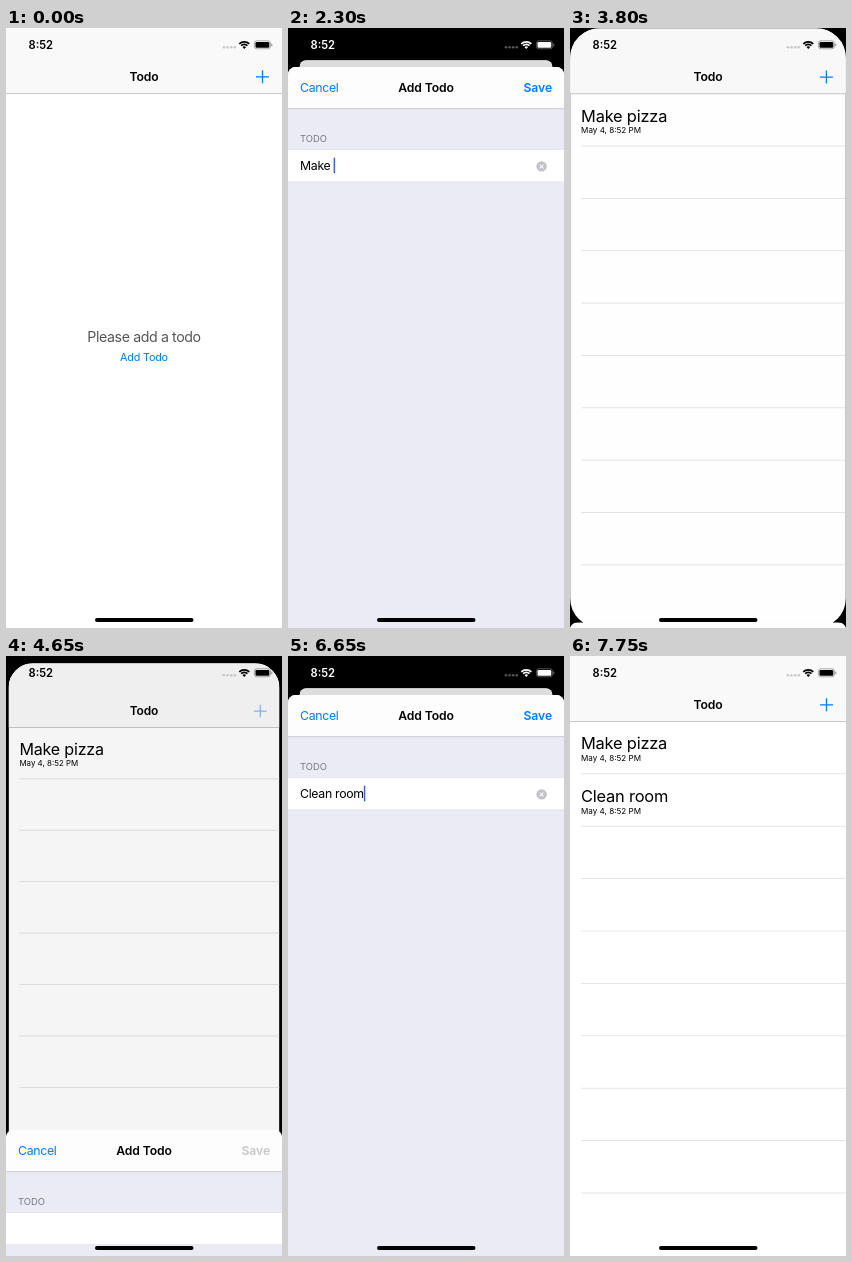
Write an HTML page with a canvas that moves like this. It is 276x600 px and loops after 7.85 s.

```html
<!DOCTYPE html>
<html lang="en">
<head>
<meta charset="utf-8">
<title>Todo</title>
<style>
html, body { margin: 0; width: 100%; height: 100%; overflow: hidden; background: #fff; }
canvas { display: block; width: 276px; height: 600px; }
</style>
</head>
<body>
<canvas id="stage"></canvas>
<script>
const W = 276, H = 600, LOOP = 7850, STEP = 50;
const SHEET_TOP = 39, SHEET_H = H - SHEET_TOP, DEVICE_RADIUS = 30;
const CARD_INSET = 11.5, CARD_TOP = 32.2;
const BLUE = [0, 122, 255], DIMMED_TINT = [160, 164, 170];
const BODY = { size: 12.3, track: -0.3 };
const BOLD = { size: 12.2, track: -0.1, weight: 600 };

const canvas = document.getElementById('stage');
const ctx = canvas.getContext('2d');
const dpr = window.devicePixelRatio || 1;
canvas.width = W * dpr;
canvas.height = H * dpr;

// One session per added todo: button press, sheet in, typing, sheet out.
const sessions = [
  { title: 'Make pizza', press: 500, release: 750, show: 924, settled: 1550, focus: 1600, blur: 3250, hide: 3457,
    keys: [1750, 1950, 2050, 2150, 2250, 2400, 2550, 2750, 2900, 3100] },
  { title: 'Clean room', press: 4250, release: 4550, show: 4604, settled: 5250, focus: 5200, blur: 7150, hide: 7207,
    keys: [5250, 5450, 5600, 5700, 5850, 6050, 6150, 6300, 6400, 6550] }
];

const clamp = v => Math.max(0, Math.min(1, v));
const ease = k => k * k * (3 - 2 * k);
const mix = (a, b, k) => a + (b - a) * k;
const rgb = c => `rgb(${c.map(Math.round).join(',')})`;
const mixColor = (a, b, k) => rgb(a.map((v, i) => mix(v, b[i], k)));

// Critically damped spring: 0 at rest, 1 when arrived.
function spring(ms) {
  if (ms <= 0) return 0;
  const x = 19.4 * ms / 1000;
  const left = (1 + x) * Math.exp(-x);
  return left < 0.0006 ? 1 : 1 - left;
}

function setFont({ size, track = 0, weight = 400 }) {
  ctx.font = `${weight} ${size}px Inter, "Liberation Sans", sans-serif`;
  ctx.letterSpacing = `${track}px`;
}

function text(str, x, y, style, color, align = 'left') {
  setFont(style);
  ctx.fillStyle = color;
  ctx.textAlign = align;
  ctx.fillText(str, x, y);
}

function rect(x, y, w, h, color) {
  ctx.fillStyle = color;
  ctx.fillRect(x, y, w, h);
}

function pill(x, y, w, h, r, color) {
  ctx.beginPath();
  ctx.roundRect(x, y, w, h, r);
  ctx.fillStyle = color;
  ctx.fill();
}

function cross(x, y, r, width, color) {
  ctx.beginPath();
  ctx.moveTo(x - r, y);
  ctx.lineTo(x + r, y);
  ctx.moveTo(x, y - r);
  ctx.lineTo(x, y + r);
  ctx.strokeStyle = color;
  ctx.lineWidth = width;
  ctx.stroke();
}

function drawEmpty() {
  text('Please add a todo', W / 2, 314, { size: 14.2, track: -0.4 }, '#555', 'center');
  text('Add Todo', W / 2, 333, { size: 10.8, track: -0.2 }, rgb(BLUE), 'center');
}

function drawRow(title, i) {
  const y = 52.4 * i;
  text(title, 11, 93.4 + y, { size: 16.4, track: -0.2 }, '#000');
  text('May 4, 8:52 PM', 11, 105.2 + y, { size: 8.1 }, '#000');
}

// How far the todo of a session has faded into the list.
const addedAmount = (t, s) => ease(clamp((t - s.hide) / 300));

function drawList(t, opacity) {
  ctx.globalAlpha = opacity;
  for (let i = 1; i < 10; i++) rect(11, 65 + 52.4 * i, W - 11, 0.8, '#dededf');
  sessions.forEach((s, i) => {
    ctx.globalAlpha = addedAmount(t, s);
    drawRow(s.title, i);
  });
  ctx.globalAlpha = 1;
}

function plusOpacity(t, s) {
  if (t < s.press) return 1;
  return t < s.release ? 0.2 : mix(0.2, 1, clamp((t - s.release) / 250));
}

function drawMain(t, s, p) {
  ctx.save();
  if (p > 0) {
    const scale = 1 - 2 * CARD_INSET * p / W;
    ctx.translate(CARD_INSET * p, CARD_TOP * p);
    ctx.scale(scale, scale);
    ctx.beginPath();
    ctx.roundRect(0, 0, W, H, mix(DEVICE_RADIUS, 7.4, p));
    ctx.clip();
  }
  rect(0, 0, W, H, '#fff');
  const listOpacity = addedAmount(t, sessions[0]);
  if (listOpacity < 1) {
    ctx.globalAlpha = 1 - listOpacity;
    drawEmpty();
  }
  if (listOpacity > 0) drawList(t, listOpacity);
  rect(0, 0, W, 65, '#f9f9f9');
  rect(0, 65, W, 0.9, '#c2c2c4');
  text('Todo', W / 2, 53.2, BOLD, '#000', 'center');
  ctx.globalAlpha = plusOpacity(t, s);
  cross(256.5, 48.8, 6.5, 1.3, mixColor(BLUE, DIMMED_TINT, p));
  ctx.globalAlpha = 1;
  if (p > 0) rect(0, 0, W, H, `rgba(0,0,0,${0.115 * p ** 0.7})`);
  ctx.restore();
}

function drawClearButton(y) {
  ctx.beginPath();
  ctx.arc(253.6, y, 5.2, 0, 7);
  ctx.fillStyle = '#c2c2c6';
  ctx.fill();
  ctx.save();
  ctx.translate(253.6, y);
  ctx.rotate(Math.PI / 4);
  cross(0, 0, 2.7, 1, '#fff');
  ctx.restore();
}

function drawSheet(t, s, p) {
  const typed = s.title.slice(0, s.keys.filter(k => k <= t).length);
  const editing = t >= s.focus && t < s.blur;
  const bottomRadius = t < s.settled ? DEVICE_RADIUS : 0;
  ctx.save();
  ctx.translate(0, mix(H, SHEET_TOP, p));
  ctx.beginPath();
  ctx.roundRect(0, 0, W, SHEET_H, [7.4, 7.4, bottomRadius, bottomRadius]);
  ctx.clip();
  rect(0, 0, W, SHEET_H, '#ebebf5');
  rect(0, 0, W, 41.4, '#fdfdfd');
  rect(0, 41.4, W, 0.8, '#c4c4c8');
  text('Cancel', 12, 25, BODY, rgb(BLUE));
  text('Add Todo', W / 2, 25, BOLD, '#000', 'center');
  text('Save', 264, 25, BOLD, typed ? rgb(BLUE) : '#c8c8cc', 'right');
  text('TODO', 12, 74.9, { size: 9.4 }, '#78787e');
  rect(0, 82.6, W, 32.2, '#fff');
  rect(0, 82.4, W, 0.6, '#dcdce2');
  rect(0, 114.6, W, 0.6, '#dcdce2');
  text(typed, 12, 102.8, BODY, '#000');
  if (editing) {
    setFont(BODY);
    rect(12 + ctx.measureText(typed).width, 90.7, 1.5, 15.6, '#4062d8');
    if (typed) drawClearButton(99.4);
  }
  ctx.restore();
}

function drawWifi(x, y, color) {
  const from = -Math.PI * 0.75, to = -Math.PI * 0.25;
  ctx.strokeStyle = ctx.fillStyle = color;
  ctx.lineWidth = 1.7;
  for (const r of [7.1, 4.5]) {
    ctx.beginPath();
    ctx.arc(x, y, r, from, to);
    ctx.stroke();
  }
  ctx.beginPath();
  ctx.moveTo(x, y);
  ctx.arc(x, y, 2.6, from, to);
  ctx.fill();
}

function drawStatusBar(p) {
  const light = clamp((p - 0.35) / 0.4);
  const color = mixColor([0, 0, 0], [255, 255, 255], light);
  text('8:52', 22.5, 21, { size: 11.2, weight: 600 }, color);
  ctx.fillStyle = mixColor([200, 200, 200], [85, 85, 85], light);
  for (let i = 0; i < 4; i++) {
    ctx.beginPath();
    ctx.arc(218 + 3.6 * i, 19.2, 1.3, 0, 7);
    ctx.fill();
  }
  drawWifi(238.3, 20.9, color);
  ctx.globalAlpha = 0.4;
  ctx.beginPath();
  ctx.roundRect(248.4, 12.8, 16, 8, 2.3);
  ctx.strokeStyle = color;
  ctx.lineWidth = 0.8;
  ctx.stroke();
  pill(265.2, 15.5, 1.1, 2.7, 0.5, color);
  ctx.globalAlpha = 1;
  pill(249.5, 13.9, 13.8, 5.8, 1.3, color);
}

function draw(t) {
  const s = t < sessions[1].press ? sessions[0] : sessions[1];
  const p = t < s.hide ? spring(t - s.show) : 1 - spring(t - s.hide);
  ctx.setTransform(dpr, 0, 0, dpr, 0, 0);
  rect(0, 0, W, H, '#000');
  drawMain(t, s, p);
  if (p > 0) drawSheet(t, s, p);
  drawStatusBar(p);
  pill(89, 590, 98.5, 4, 2, '#000');
}

function tick() {
  draw(Math.floor(performance.now() % LOOP / STEP) * STEP);
  requestAnimationFrame(tick);
}
tick();
</script>
</body>
</html>
```
